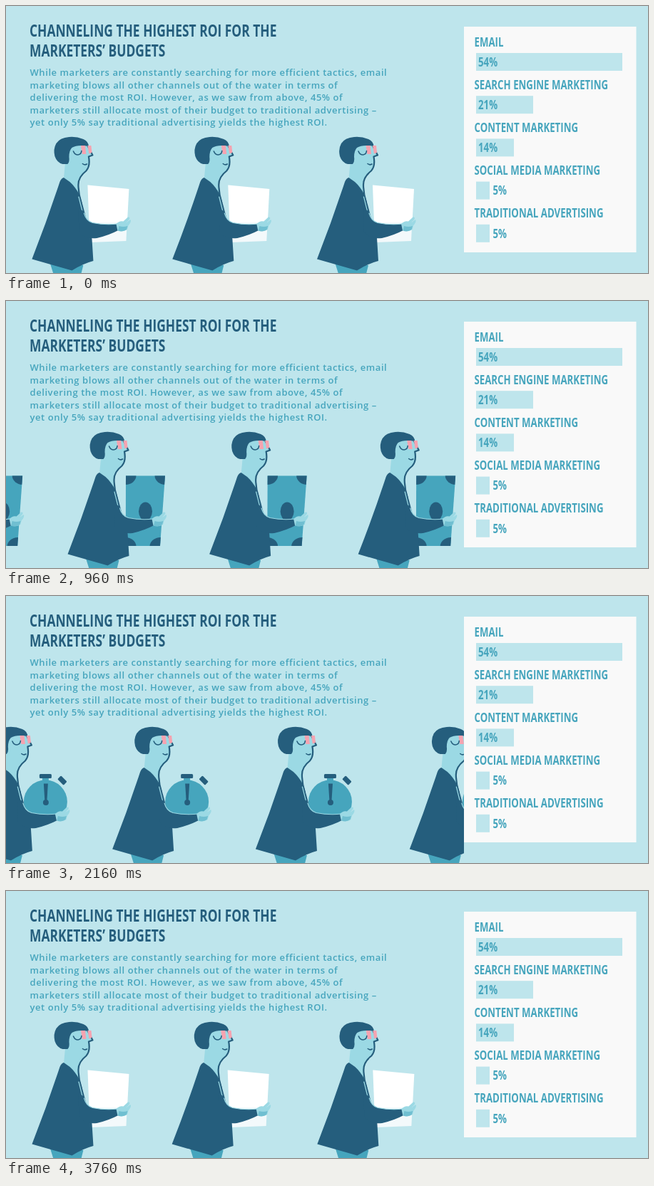
Recreate the animation shown at these times as an HTML page. Size 900 px wide and 375 px high, loop 3.84 s.

```html
<!DOCTYPE html>
<html lang="en">
<head>
<meta charset="utf-8">
<title>Marketing ROI</title>
<style>
  html, body { margin: 0; width: 100%; height: 100%; overflow: hidden; background: #bee5ec; }
  svg { display: block; width: 900px; height: 375px; }
  text { font-family: "Open Sans", "Noto Sans", sans-serif; fill: #46a5bd; }
  .cond { font-weight: 700; font-size: 17.5px; }
  .title { font-size: 23px; fill: #255e7d; }
  .body { font-weight: 600; font-size: 13px; letter-spacing: .57px; }
  .dark { fill: #255e7d; }
  .teal { fill: #46a5bd; }
  .skin { fill: #9bd9e4; }
  .line { fill: none; stroke: #255e7d; stroke-width: 2.2; stroke-linejoin: round; stroke-linecap: round; }
  .fine { stroke-width: 1.6; }
  .thin { fill: none; stroke: #9bd9e4; stroke-width: 1.2; stroke-linecap: round; }
</style>
</head>
<body>
<svg viewBox="0 0 900 375">
  <defs>
    <clipPath id="stage"><rect y="183" width="642" height="192"/></clipPath>
    <clipPath id="bill"><path d="M118.500 245.500H173.500L166.500 344H118Z"/></clipPath>

    <g id="person">
      <path class="teal" d="M62 360L109 364L106 376H67Z"/>

      <path class="skin" d="M86 198L115 194L122 210L116.500 212Q118.500 224 113 231Q103 239 102 248L105 275L81 248L84 216Z"/>
      <path class="line" d="M115.500 197L122 209.500L116.500 211.500Q119 225 113 231.500Q102 240 102 251Q102 263 106 276"/>
      <path class="line fine" d="M108 221.500Q111 224 114 222"/>
      <path class="dark" d="M116.500 197Q116 190 109 187Q99 183 89 184Q76 185 71 193Q66.500 201 69 211Q72 220 80 222H87Q90 219 89 212Q89 203 93 199Q101 194 116.500 197Z"/>
      <path fill="#f5a3b0" d="M105.500 196H111.500L113 208H107.500ZM115 196H120L121 206L117 207.500Z"/>
      <path class="line fine" d="M95 204Q97 209 101.500 209Q106 208.500 106.500 203.500"/>

      <g id="money">
        <g clip-path="url(#bill)">
          <rect class="teal" x="116" y="245" width="60" height="100"/>
          <g class="dark">
            <ellipse cx="118" cy="245" rx="15" ry="13"/>
            <ellipse cx="174" cy="245" rx="15" ry="13"/>
            <ellipse cx="118" cy="345" rx="15" ry="13"/>
            <ellipse cx="167" cy="345" rx="15" ry="13"/>
            <ellipse cx="146" cy="295.500" rx="9.500" ry="13"/>
          </g>
        </g>
      </g>

      <g id="watch">
        <circle class="teal" cx="141.500" cy="289" r="30.500"/>
        <rect class="teal" x="137" y="254" width="9" height="7"/>
        <g class="dark">
          <rect x="133" y="250" width="17" height="6" rx="1.500"/>
          <rect x="-6" y="-3.500" width="12" height="7" rx="1.500" transform="translate(165 259) rotate(45)"/>
          <path d="M139 263.500H145L143.500 288H140.500Z"/>
          <circle cx="142" cy="290" r="4"/>
        </g>
      </g>

      <g id="paper">
        <path fill="#f3f9fb" d="M117 300H170.500L169 330L119 332Z"/>
        <path fill="#fff" d="M115 251.500L173 257L170.500 304H117Z"/>
      </g>

      <path class="dark" d="M81.500 241L90 247Q98 254 104 266L108 279L114 302L121 326L123 358Q108 362 93 371.500L37 355.500Q58 302 76 247Q78 242 81.500 241Z"/>
      <path class="thin" d="M102.500 268L104.500 276L108 290"/>
      <path class="dark" d="M102 284L109 288Q112 301 122 304.500Q140 308 157 306L158 315Q145 322 128 326Q112 328 103 318Z"/>
      <path class="thin" d="M110 291Q113 302 122 304.500Q140 308 157 306"/>
      <path class="skin" d="M155 306Q160 301 165 302.500L171.500 296.500Q175 296 173.500 299.500L169.500 304L175 300Q177 302.500 172 308.500L170.500 314Q165 318 157 315.500Z"/>
      <path class="teal" opacity=".5" d="M159 309Q165 311 171 309L169.500 314Q164 318 157.500 315.500Z"/>
    </g>
  </defs>

  <rect width="900" height="375" fill="#bee5ec"/>
  <g id="copy"></g>
  <g id="walkers" clip-path="url(#stage)"></g>
  <rect x="642" y="29" width="241.500" height="317" fill="#f9f9f9"/>
  <g id="chart"></g>
</svg>

<script>
const NS = "http://www.w3.org/2000/svg";
const $ = id => document.getElementById(id);

function add(parent, tag, attrs, text = "") {
  const el = document.createElementNS(NS, tag);
  for (const k in attrs) el.setAttribute(k, attrs[k]);
  el.textContent = text;
  return parent.appendChild(el);
}

// Condensed look shared by all headings
const condensed = (parent, x, y, text, cls = "") =>
  add(parent, "text", { class: "cond " + cls, transform: `translate(${x} ${y}) scale(.758 1)` }, text);

const copy = $("copy"), chart = $("chart");
["CHANNELING THE HIGHEST ROI FOR THE", "MARKETERS’ BUDGETS"]
  .forEach((s, i) => condensed(copy, 33, 43 + i * 28, s, "title"));
[
  "While marketers are constantly searching for more efficient tactics, email",
  "marketing blows all other channels out of the water in terms of",
  "delivering the most ROI. However, as we saw from above, 45% of",
  "marketers still allocate most of their budget to traditional advertising –",
  "yet only 5% say traditional advertising yields the highest ROI."
].forEach((s, i) => add(copy, "text", { class: "body", x: 33.5, y: 98 + i * 17.5 }, s));

[
  ["EMAIL", 54, 205],
  ["SEARCH ENGINE MARKETING", 21, 80],
  ["CONTENT MARKETING", 14, 53],
  ["SOCIAL MEDIA MARKETING", 5, 19],
  ["TRADITIONAL ADVERTISING", 5, 19]
].forEach(([label, pct, w], i) => {
  const y = i * 60.2;
  condensed(chart, 656.5, 56.5 + y, label);
  add(chart, "rect", { x: 659, y: 66 + y, width: w, height: 25, fill: "#bee5ec" });
  condensed(chart, w < 30 ? 682.5 : 662, 84.7 + y, pct + "%");
});

// Shift at the start of the loop, and speed in px per ms
const walkers = [[-201.7, .0535], [-.6, .0522], [196.3, .054], [399, .0601]]
  .map(([x, v]) => ({ x, v, el: add($("walkers"), "use", { href: "#person" }) }));

const LOOP = 3840, STEP = 80;
const ramp = (t, mid) => Math.min(1, Math.max(0, (t - mid) / 480 + .5));

function draw(now) {
  const t = Math.floor(now % LOOP / STEP) * STEP;
  for (const w of walkers)
    w.el.setAttribute("transform", `translate(${(w.x + w.v * t).toFixed(2)} 0)`);

  const a = ramp(t, 320), b = ramp(t, 1600), c = ramp(t, 2880);
  $("paper").setAttribute("opacity", 1 - a + c);
  $("money").setAttribute("opacity", a - b);
  $("watch").setAttribute("opacity", b - c);
}

const start = performance.now();
function tick() {
  draw(performance.now() - start);
  requestAnimationFrame(tick);
}
tick();
</script>
</body>
</html>
```
